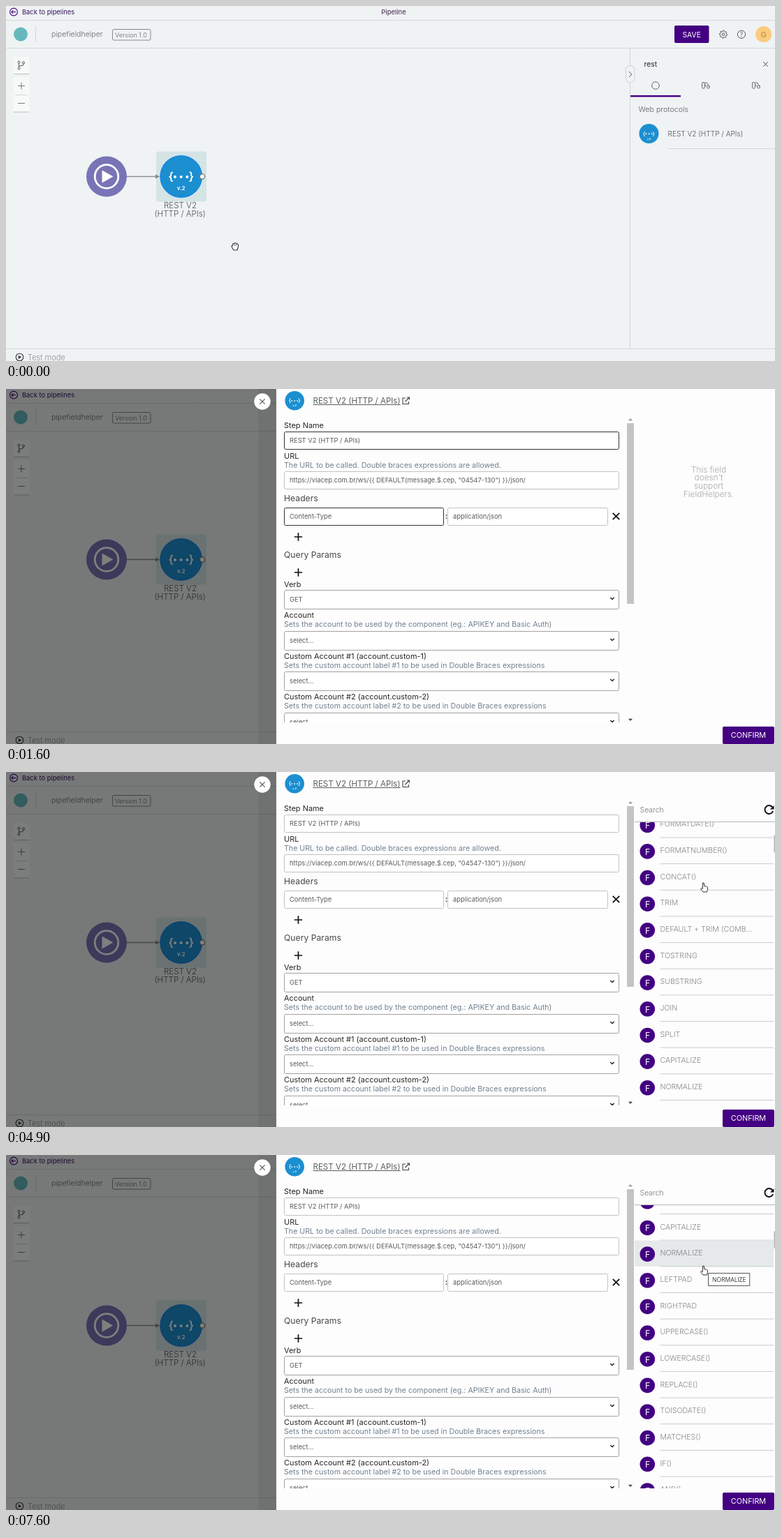
An HTML page with a canvas that plays this animation: 1101x509 px, repeating every 8000 ms.

```html
<!DOCTYPE html>
<html lang="en">
<head>
<meta charset="utf-8">
<title>Pipeline editor</title>
<style>
html, body { margin: 0; width: 100%; height: 100%; overflow: hidden; background: #eff3f4; }
canvas { display: block; }
</style>
</head>
<body>
<canvas id="stage" width="1101" height="509"></canvas>
<script>
const ctx = document.getElementById('stage').getContext('2d');
const LOOP = 8000, W = 1101, H = 509, PANEL = 387, ROW = 37.65;
const PURPLE = '#430082', BLUE = '#1c8fd0', BG = '#eff3f4', INK = '#4f5254', LINE = '#d3d7d9';
const UI = 'Inter, sans-serif', SYSTEM = '"Open Sans", sans-serif';
const URL_TEXT = 'https://viacep.com.br/ws/{{ DEFAULT(message.$.cep, "04547-130") }}/json/';
const FUNCTIONS = ['DEFAULT()', 'NOW()', 'FORMATDATE()', 'FORMATNUMBER()', 'CONCAT()', 'TRIM',
  'DEFAULT + TRIM (COMB...', 'TOSTRING', 'SUBSTRING', 'JOIN', 'SPLIT', 'CAPITALIZE', 'NORMALIZE',
  'LEFTPAD', 'RIGHTPAD', 'UPPERCASE()', 'LOWERCASE()', 'REPLACE()', 'TOISODATE()', 'MATCHES()',
  'IF()', 'AND()'];

// Progress of a change that begins at `start` and takes `steps` ticks of 100 ms.
const progress = (now, start, steps) => Math.min(1, Math.max(0, (now - start + 100) / (steps * 100)));
const smooth = p => p * p * (3 - 2 * p);
const mix = (a, b, p) => a + (b - a) * p;

function text(s, x, y, size, color = INK, { weight = 400, align = 'left', font = UI } = {}) {
  ctx.font = `${weight} ${size}px ${font}`;
  ctx.textAlign = align;
  ctx.fillStyle = color;
  ctx.fillText(s, x, y + size * 0.36);
  return ctx.measureText(s).width;
}

function box(x, y, w, h, r, fill, stroke, lineWidth = 1) {
  ctx.beginPath();
  ctx.roundRect(x, y, w, h, r);
  paint(fill, stroke, lineWidth);
}

function circle(x, y, r, fill, stroke, lineWidth = 1) {
  ctx.beginPath();
  ctx.arc(x, y, r, 0, Math.PI * 2);
  paint(fill, stroke, lineWidth);
}

function paint(fill, stroke, lineWidth = 1) {
  if (fill) { ctx.fillStyle = fill; ctx.fill(); }
  if (stroke) { ctx.strokeStyle = stroke; ctx.lineWidth = lineWidth; ctx.stroke(); }
}

function lines(color, lineWidth, ...paths) {
  ctx.beginPath();
  for (const [x, y, ...rest] of paths) {
    ctx.moveTo(x, y);
    for (let i = 0; i < rest.length; i += 2) ctx.lineTo(rest[i], rest[i + 1]);
  }
  paint(null, color, lineWidth);
}

function polygon(x, y, points, fill, stroke, lineWidth) {
  ctx.beginPath();
  for (let i = 0; i < points.length; i += 2) ctx.lineTo(x + points[i], y + points[i + 1]);
  ctx.closePath();
  paint(fill, stroke, lineWidth);
}

const cross = (x, y, r, color, lw) => lines(color, lw, [x - r, y - r, x + r, y + r], [x + r, y - r, x - r, y + r]);
const plus = (x, y, r, color, lw) => lines(color, lw, [x - r, y, x + r, y], [x, y - r, x, y + r]);

function clipped(x, y, w, h, draw) {
  ctx.save();
  ctx.beginPath();
  ctx.rect(x, y, w, h);
  ctx.clip();
  draw();
  ctx.restore();
}

function restIcon(x, y, r) {
  const k = r / 30;
  circle(x, y, r, BLUE);
  text('{', x - 14.5 * k, y - 0.3 * k, 16 * k, '#fff', { weight: 600, align: 'center' });
  text('}', x + 14.5 * k, y - 0.3 * k, 16 * k, '#fff', { weight: 600, align: 'center' });
  for (const i of [-1, 0, 1]) circle(x + i * 8.6 * k, y + 0.5 * k, 2 * k, '#fff');
  text('v.2', x, y + 16.3 * k, 7.4 * k, '#fff', { weight: 700, align: 'center' });
}

function playIcon(x, y) {
  circle(x, y, 5.3, null, '#333', 1.1);
  polygon(x, y, [-1.7, -2.6, 2.8, 0, -1.7, 2.6], '#333');
}

function topBar() {
  circle(11, 8.5, 5.4, null, PURPLE, 1.1);
  lines(PURPLE, 1.1, [14, 8.5, 8, 8.5], [10.3, 6, 8, 8.5, 10.3, 11]);
  text('Back to pipelines', 23, 9, 9.35, '#36135e');
  text('Pipeline', 555, 9, 9.5, '#45234f', { align: 'center' });
  lines(LINE, 1, [0, 20.5, W, 20.5], [0, 60.5, W, 60.5], [42.5, 28, 42.5, 52], [0, 491.5, W, 491.5]);
  circle(21, 40.5, 10, '#65b9bd');
  text('pipefieldhelper', 65, 40.5, 10.6, '#66696b', { weight: 300 });
  box(152.5, 33.5, 54.5, 15.5, 2, null, '#85898c');
  text('Version 1.0', 156, 41.5, 9.1, '#66696b', { weight: 300 });
  box(957, 28, 49.5, 25, 2, PURPLE);
  text('SAVE', 981.7, 41, 10.4, '#fff', { align: 'center' });
  ctx.beginPath();
  for (let i = 0; i < 32; i++) {
    const a = i * Math.PI / 16, r = i % 4 < 2 ? 5.6 : 4.3;
    ctx.lineTo(1027 + r * Math.cos(a), 40.7 + r * Math.sin(a));
  }
  ctx.closePath();
  paint(null, '#555');
  circle(1027, 40.7, 1.8, null, '#555');
  circle(1053, 40.7, 5.6, null, '#555');
  text('?', 1053, 40.9, 8.5, '#555', { align: 'center' });
  circle(1084.7, 40.5, 11.6, '#fbcc80');
  text('G', 1084.7, 41, 11, '#b98736', { align: 'center' });
}

function toolButtons() {
  ctx.fillStyle = 'rgba(255,255,255,.5)';
  ctx.fillRect(10.5, 73, 23, 24);
  ctx.fillRect(10.5, 102, 23, 50);
  lines('#b9bec0', 1, [11, 97.5, 33, 97.5], [11, 152, 33, 152]);
  lines(LINE, 1, [13, 127.5, 31, 127.5]);
  circle(18.5, 80.5, 1.6, null, '#555');
  circle(25, 81.5, 1.6, null, '#555');
  circle(18.5, 89.5, 1.6, null, '#555');
  lines('#555', 1, [18.5, 82, 18.5, 88], [25, 83, 24, 85.5, 18.5, 86]);
  plus(22, 114.5, 5, '#777', 1);
  lines('#777', 1, [17, 139.5, 27, 139.5]);
}

function flow(selected) {
  if (selected) {
    box(215, 208.5, 72, 72, 3, '#d5e5e6');
    ctx.fillStyle = '#c8dcdd';
    for (let y = 211; y < 280; y += 4) for (let x = 217; x < 286; x += 4) ctx.fillRect(x, y, 1, 1);
  }
  lines('#8c9092', 1.4, [173, 244.5, 217, 244.5]);
  polygon(220, 244.5, [0, 0, -6, -3, -6, 3], '#85898b');
  circle(144, 244.5, 29, '#7974b6');
  circle(144, 244.5, 16.8, null, '#fff', 2.8);
  polygon(144, 244.5, [-6.5, -9, 9.5, 0, -6.5, 9], '#fff');
  restIcon(250.7, 244.5, 30.2);
  if (selected) circle(250.7, 244.5, 29.6, null, '#1686e8', 1.3);
  circle(281, 244.5, 3.6, '#fff', '#74787a', 1.3);
  text('REST V2', 249.5, 286, 11.6, INK, { align: 'center', weight: 300 });
  text('(HTTP / APIs)', 249.2, 297.8, 11.6, INK, { align: 'center', weight: 300 });
}

function sidebar() {
  lines(LINE, 1, [893.5, 61, 893.5, 491]);
  box(887.5, 85.5, 12.5, 24.5, 6, BG, '#cbd0d2');
  lines('#555', 1, [892, 94, 895.8, 98, 892, 102]);
  text('rest', 913.5, 83.5, 10.4, '#222');
  cross(1087.5, 83.5, 3.2, '#444', 1);
  circle(930, 114, 5.3, null, '#666');
  for (const x of [1002, 1074]) {
    box(x - 5.5, 109.5, 4, 8.5, 1.5, null, '#666');
    lines('#666', 1, [x - 1, 110, x + 1.5, 110, x + 5.5, 116], [x - 1, 114, x + 1, 114]);
    circle(x + 3.5, 116, 2, null, '#666');
  }
  ctx.fillStyle = PURPLE;
  ctx.fillRect(894, 128, 72, 2.4);
  text('Web protocols', 905.5, 148, 10.7, '#5c5f61', { weight: 300 });
  restIcon(920.5, 183, 14);
  text('REST V2 (HTTP / APIs)', 947.5, 183, 10.1, '#4f5254', { weight: 300 });
  lines(LINE, 1, [948, 204.5, W, 204.5]);
}

function page(now) {
  ctx.fillStyle = BG;
  ctx.fillRect(0, 0, W, H);
  topBar();
  toolButtons();
  flow(now < 300 || now >= 1300);
  sidebar();
  playIcon(19.5, 503.5);
  text('Test mode', 31, 504, 11, '#8b8f91', { weight: 300 });
}

const label = (s, y, x = 398) => text(s, x, y, 10.95, '#262626');
const hint = (s, y, x = 398) => text(s, x, y, 10.65, '#738190');
const heading = (s, y) => text(s, 398, y, 12.2, '#484848');

function field(value, y, { x = 398, w = 479, active = false, select = false } = {}) {
  box(x + 0.5, y + 0.5, w, select ? 27 : 25, 2, '#fff', active ? '#333' : select ? '#a2a2a2' : '#c2c2c2');
  text(value, x + 8, y + (select ? 13.8 : 12.9), 9.35, '#5a5a5a');
  if (select) lines('#222', 1.4, [865.3, y + 11, 868, y + 13.6, 870.7, y + 11]);
}

function urlField(now) {
  const focused = now >= 2500 && now < 3300;
  field(URL_TEXT, 118, { active: focused || (now >= 2000 && now < 2500) });
  if (!focused) return;
  const start = 406 + ctx.measureText(URL_TEXT.slice(0, -5)).width;
  const width = ctx.measureText('json').width;
  ctx.beginPath();
  for (let i = 0; i <= width; i++) ctx.lineTo(start + i, 136 + (i % 2 ? 0.7 : -0.7));
  paint(null, '#d44', 0.8);
}

function accountFields() {
  const accounts = [
    ['Account', 'Sets the account to be used by the component (eg.: APIKEY and Basic Auth)'],
    ...[1, 2].map(n => [`Custom Account #${n} (account.custom-${n})`,
      `Sets the custom account label #${n} to be used in Double Braces expressions`])];
  accounts.forEach(([name, note], i) => {
    const y = 324 + i * 58.6;
    label(name, y);
    hint(note, y + 13.4);
    field('select...', Math.round(y + 22.6), { select: true });
  });
}

function loadingFields() {
  for (const i of [0, 1, 2]) text('Loading', 398, 325 + i * 11.7, 12.3, '#555');
  label('Connect Timeout (in ms)', 359);
  field('30000', 367);
  label('Read Timeout (in ms)', 402);
  field('30000', 410);
  box(398, 448.5, 36, 18, 9, '#414141');
  circle(406.8, 457.5, 7.8, '#fff');
  cross(423, 457.5, 3, '#fff', 2.2);
  label('Stop On Client Error', 448, 441);
  hint('When this option enabled, the pipeline execution will be interrupted in case of any', 460.5, 441);
  hint('client side error (4XX).', 471, 441);
}

function form(now) {
  const loaded = now >= 1600;
  label('Step Name', 52.5);
  field('REST V2 (HTTP / APIs)', 61, { active: now >= 1400 && now < 2500 });
  label('URL', 96);
  hint('The URL to be called. Double braces expressions are allowed.', 109);
  urlField(now);
  heading('Headers', 157);
  field('Content-Type', 170, { w: 228, active: now >= 1400 && now < 1800 });
  text(':', 628.7, 182.5, 11, '#222', { weight: 600 });
  field('application/json', 170, { x: 632, w: 229 });
  cross(873.5, 182.5, 4.7, '#111', 1.8);
  plus(418.5, 212, 5.7, '#111', 1.7);
  heading('Query Params', 237.5);
  plus(418.5, 263, 5.7, '#111', 1.7);
  label('Verb', 280.5);
  field('GET', 288, { select: true });
  if (loaded) accountFields(); else loadingFields();
  ctx.fillStyle = '#c4c4c4';
  ctx.fillRect(889, 49, 10, loaded ? 259 : 370);
  polygon(894, 43.5, [-3, 1.8, 0, -1.6, 3, 1.8], '#9a9a9a');
  polygon(894, 474.5, [-3, -1.8, 0, 1.6, 3, -1.8], '#444');
}

function savedData() {
  ctx.save();
  ctx.shadowColor = 'rgba(0,0,0,.3)';
  ctx.shadowBlur = 3;
  ctx.shadowOffsetY = 1;
  box(398, 144.5, 289.5, 76, 2, '#fff');
  ctx.restore();
  lines('#aaa', 0.8, [687.5, 145, 687.5, 220]);
  text('Saved data', 408.5, 156.5, 7.9, '#666a82', { font: SYSTEM });
  cross(676.5, 156.5, 3, '#333', 1);
  for (const y of [181.5, 206]) text(URL_TEXT.slice(0, -5) + '...', 407.5, y, 8.15, '#2b1717', { font: SYSTEM });
}

function functionList(now) {
  const scroll = 184.3 * smooth(progress(now, 4700, 5)) + 245.8 * smooth(progress(now, 6500, 4));
  const hovered = now < 3600 ? -1 : now < 5500 ? 1 : now < 7100 ? 6 : 12;
  text('Search', 907.5, 54, 10.5, '#77797b', { weight: 300 });
  ctx.beginPath();
  ctx.arc(1092.5, 54, 6, -0.65, 0.37, true);
  paint(null, '#111', 1.9);
  polygon(1099.5, 48, [0, 0, 0, 5.5, -5.5, 5.5], '#111');
  lines('#b5b8ba', 1, [900, 71.5, W, 71.5]);
  clipped(900, 72, 201, 406, () => {
    text('functions', 911.5, 86.5 - scroll, 10.8, '#444');
    FUNCTIONS.forEach((name, i) => {
      const y = 118.8 + i * ROW - scroll;
      if (i === hovered) {
        ctx.fillStyle = '#e5e9ea';
        ctx.fillRect(900, y - 18, 199, ROW - 0.5);
      }
      circle(918.3, y + 1.6, 10.8, PURPLE);
      text('F', 918.6, y + 2, 12.3, '#fff', { align: 'center' });
      text(name, 936.5, y, 10.6, '#818487', { weight: 300 });
      lines('#c9cccd', 1, [936.5, y + 19.3, 1099, y + 19.3]);
    });
    ctx.fillStyle = '#b4b4b4';
    ctx.fillRect(1099.5, 83.5 + scroll * 0.06, 2, 24.5);
  });
}

function sideHelp(now) {
  const shown = progress(now, 2500, 5);
  if (shown < 1) {
    ctx.globalAlpha = 1 - shown;
    ['This field', "doesn't", 'support', 'FieldHelpers.'].forEach((s, i) =>
      text(s, 1006, 115.5 + i * 11.6, 11.8, '#a6a8aa', { weight: 300, align: 'center' }));
  }
  ctx.globalAlpha = shown;
  if (shown > 0) functionList(now);
  ctx.globalAlpha = 1;
}

function panel(now) {
  const p = progress(now, 700, 9);
  if (p === 0) return;
  const open = 1 - Math.pow(1 - p, 1.94);
  const dx = Math.round((W - PANEL) * (1 - open)), left = PANEL + dx, band = 26 * open * open;
  ctx.fillStyle = `rgba(0,0,0,${0.5 * open})`;
  ctx.fillRect(0, 0, W, H);
  ctx.fillStyle = 'rgba(0,0,0,.06)';
  ctx.fillRect(left - band, 0, band, H);
  circle(left - 20, 18, 11.7, '#fff');
  cross(left - 20, 18, 3.7, '#555', 1.1);

  ctx.save();
  ctx.translate(dx, 0);
  ctx.fillStyle = '#fdfdfd';
  ctx.fillRect(PANEL, 0, W - PANEL, H);
  restIcon(413.2, 16.7, 13.8);
  const width = text('REST V2 (HTTP / APIs)', 439.5, 17, 11.55, '#5c5e60');
  lines('#5c5e60', 1, [439.5, 22.5, 439.5 + width, 22.5]);
  lines('#444', 1.1, [572, 13, 568, 13, 568, 21.5, 576.5, 21.5, 576.5, 18],
    [571.5, 18, 577.5, 12], [574, 12, 577.5, 12, 577.5, 15.5]);
  clipped(PANEL, 38, 514, 440, () => form(now));
  if (now >= 2500 && now < 3200) savedData();
  sideHelp(now);
  box(1026, 484, 74, 25, 2, PURPLE);
  text('CONFIRM', 1063, 496.3, 10.8, '#fff', { align: 'center' });
  ctx.restore();
}

function tooltip(now) {
  const [s, x] = now >= 4000 && now < 4700 ? ['NOW()', 1005]
    : now >= 6000 && now < 6500 ? ['DEFAULT + TRIM (COMBO)', 995.5]
    : now >= 7600 ? ['NORMALIZE', 1005] : [];
  if (!s) return;
  ctx.font = `400 8.6px ${SYSTEM}`;
  box(x + 0.5, 169.5, ctx.measureText(s).width + 11, 18, 0, '#fff', '#555');
  text(s, x + 6, 178.5, 8.6, '#333', { font: SYSTEM });
}

const arrow = (x, y) => polygon(x, y, [0, 0, 0, 10, 2.3, 7.8, 4, 11.3, 5.6, 10.5, 4, 7.2, 7, 7], '#fff', '#333', 0.9);

const pointer = (x, y) => polygon(x, y, [-1, 0, 0.8, 0, 1.2, 4.5, 4, 5, 6, 6.3, 6, 9.5, 4.8, 13, -0.5, 13, -4, 8.3,
  -3, 7.3, -1.2, 8.5], '#fff', '#333', 1);

function grab(x, y) {
  polygon(x, y, [-5, -1, -3.6, -1.5, -3.2, -4, -1.6, -4.8, 0, -5.2, 1.6, -4.8, 3.2, -4, 4.7, -2.5, 4, 2, 2.8, 5,
    -2, 5, -4, 2], '#fff', '#333', 1.1);
  lines('#333', 0.8, [x - 1.3, y - 4, x - 1, y - 1], [x + 1.3, y - 4, x + 1.2, y - 1]);
}

function cursor(now) {
  if (now < 1500) {
    const p = smooth(progress(now, 100, 5)), q = smooth(progress(now, 1100, 5));
    if (p < 0.8) grab(mix(328, 261, p), mix(345, 259, p));
    else arrow(mix(261, 500, q), mix(259, 184, q));
  } else if (now >= 2800) {
    const p = progress(now, 2500, 6), q = smooth(progress(now, 3200, 6));
    const x = mix(mix(700, 817.5, p), 998.5, q), y = mix(mix(131, 104.5, p), 159, q);
    (x > 900 ? pointer : arrow)(x, y);
  }
}

function render(time) {
  const now = Math.floor((time % LOOP) / 100) * 100;
  page(now);
  panel(now);
  tooltip(now);
  cursor(now);
  requestAnimationFrame(tick);
}

const began = performance.now();
const tick = () => render(performance.now() - began);
tick();
</script>
</body>
</html>
```
